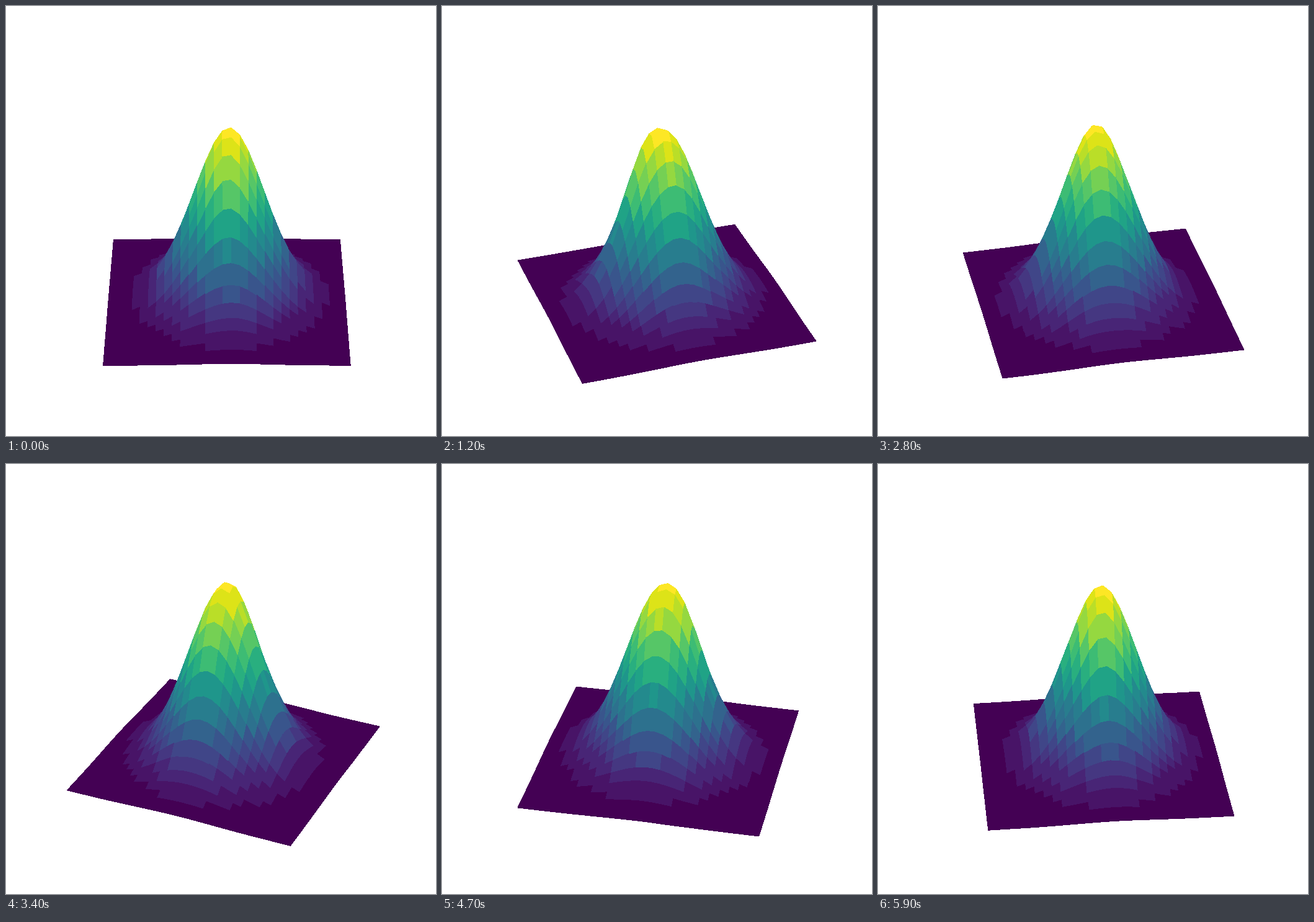
Write a matplotlib script that moves like this. It is 693 px wide and 693 px high and loops after 6 s.

```python
import numpy as np
import matplotlib
import matplotlib.pyplot as plt
from matplotlib.animation import FuncAnimation

SIZE, DPI = 693, 100
FRAMES, INTERVAL = 60, 100
POINTS, HALF = 30, 3.0
PAD = 25 / 24  # offsets the enlarged default 3D box


def bump(x, y, cx, cy, sx, sy):
    return np.exp(-((x - cx) / sx) ** 2 / 2 - ((y - cy) / sy) ** 2 / 2)


def density(x, y):
    """Slightly lopsided bell with the small waves of a sampled density."""
    z = 0.9 * bump(x, y, 0, 0.06, 1.0, 0.97)
    z += 0.12 * bump(x, y, 0.5, 0, 0.4, 0.4)
    z += 0.04 * bump(x, y, -0.45, 0.4, 0.45, 0.45)
    rng = np.random.default_rng(4)
    fade = np.exp(-(x ** 2 + y ** 2) / 6)
    for cx, cy, amp in zip(rng.uniform(-3, 3, 45), rng.uniform(-3, 3, 45),
                           rng.normal(0, 0.011, 45)):
        z += amp * fade * bump(x, y, cx, cy, 0.38, 0.38)
    z = np.clip(z, 0, None)
    return z / z.max()


axis = np.linspace(-HALF, HALF, POINTS)
x, y = np.meshgrid(axis, axis)
z = density(x, y)

fig = plt.figure(figsize=(SIZE / DPI, SIZE / DPI), dpi=DPI, facecolor="white")
ax = fig.add_axes([0, 0, 1, 1], projection="3d")
ax.set_axis_off()
ax.plot_surface(x, y, z, cmap=matplotlib.colormaps["viridis"].resampled(20),
                vmin=-0.015, vmax=1, linewidth=0, antialiased=False)

side = HALF * 1.1 * PAD
ax.set_xlim(-side, side)
ax.set_ylim(-side, side)
ax.set_zlim(0.5 - 0.5 * PAD, 0.5 + 0.5 * PAD)


def update(i):
    ax.view_init(elev=30, azim=i * 360 / FRAMES)
    return []


anim = FuncAnimation(fig, update, frames=FRAMES, interval=INTERVAL,
                     repeat=True, repeat_delay=0)
plt.show()
```
